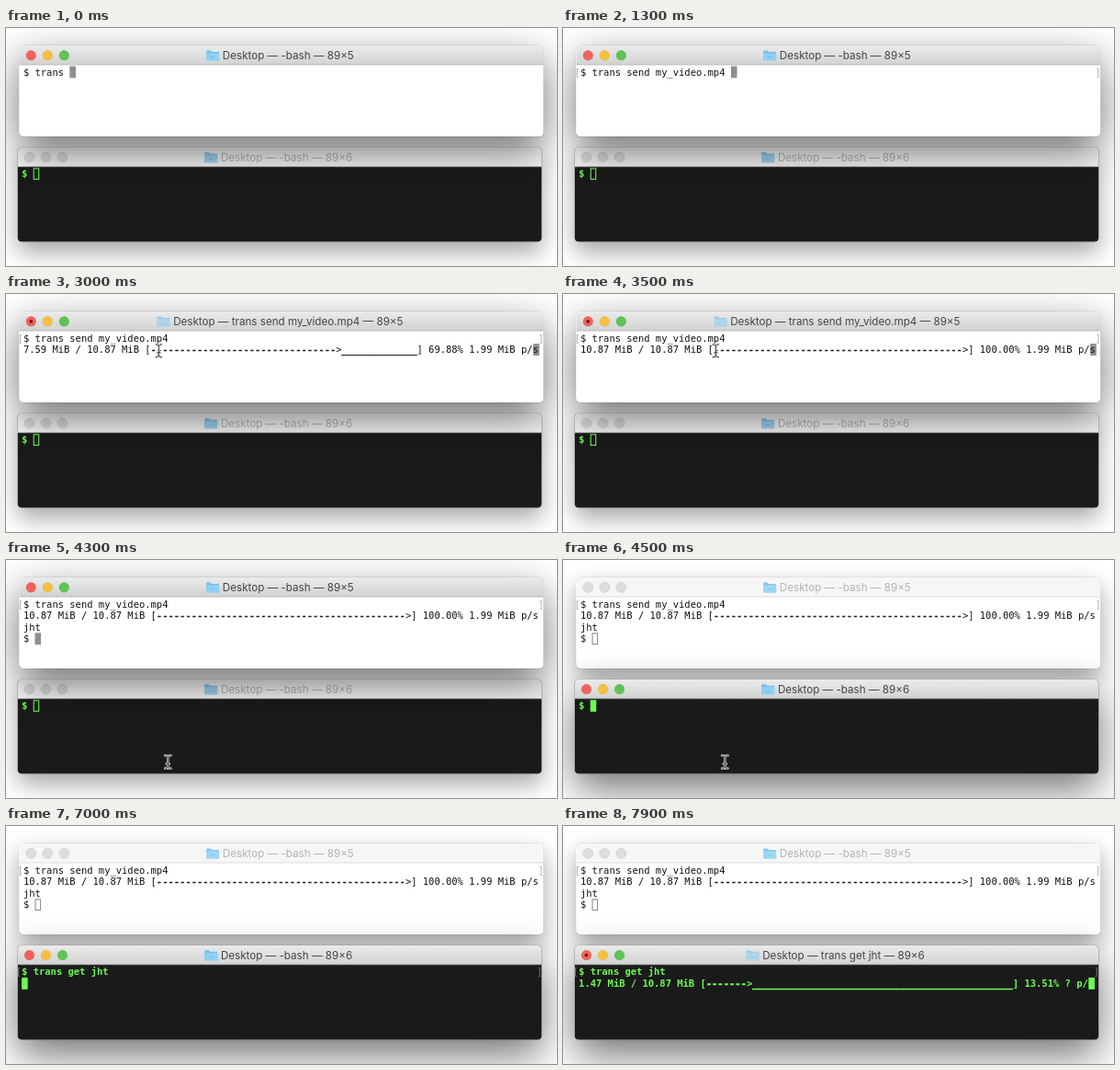
These frames come from a looping animation (600 by 259 pixels, 8000 ms). An HTML page:

```html
<!DOCTYPE html>
<html lang="en">
<head>
<meta charset="utf-8">
<title>Two terminals</title>
<style>
html, body { margin: 0; width: 100%; height: 100%; overflow: hidden; background: #fff; }
#stage { position: relative; width: 600px; height: 259px; overflow: hidden; background: #fff; }
.win {
  position: absolute; left: 0; top: 0; width: 570.6px; border-radius: 5px; z-index: 1;
  box-shadow: 0 0 0 .5px rgba(0,0,0,.12), 0 11px 26px rgba(0,0,0,.36);
}
.win.active {
  z-index: 2;
  box-shadow: 0 0 0 .5px rgba(0,0,0,.14), 0 16px 44px rgba(0,0,0,.56);
}
.win svg { display: block; width: 100%; height: 100%; border-radius: 5px; }
.light { --ink: #111; --paper: #fff; --cursor: #8f8f8f; --mark: #aaa; }
.dark { --ink: #6dfb55; --paper: #1a1a1a; --cursor: #6dfb55; --mark: #777; font-weight: bold; }
.paper { fill: var(--paper); }
.bar { fill: #f6f6f6; }
.active .bar { fill: url(#chrome); }
.rule { fill: #d4d4d4; }
.active .rule { fill: #b2b2b2; }
.light-btn { fill: #dddddd; stroke: #cbcbcb; stroke-width: .6; }
.active .light-btn { fill: var(--c); stroke: rgba(0,0,0,.08); }
.title { font: 11.63px Inter, sans-serif; fill: #b4b4b4; text-anchor: middle; }
.active .title { fill: #444; }
.row { font-family: "DejaVu Sans Mono", monospace; font-size: 10.48px; fill: var(--ink); white-space: pre; }
.run { stroke: var(--ink); stroke-width: .5; }
.mark { fill: var(--mark); font-weight: normal; }
.cursor { fill: none; stroke: var(--cursor); stroke-width: 1.1; }
.active .cursor { fill: var(--cursor); }
#mouse { position: absolute; left: 0; top: 0; z-index: 3; }
</style>
</head>
<body>
<div id="stage">
  <svg id="mouse" width="600" height="259">
    <defs>
      <linearGradient id="chrome" x2="0" y2="1">
        <stop stop-color="#ebebeb"/><stop offset="1" stop-color="#d2d2d2"/>
      </linearGradient>
      <path id="beamPath" d="M-3.2-7Q0-7 0-5Q0-7 3.2-7M0-5V5M-3.2 7Q0 7 0 5Q0 7 3.2 7M-1.6 2H1.6"/>
    </defs>
    <g id="beam" fill="none" stroke-linecap="round">
      <use href="#beamPath" stroke="#e4e4e4" stroke-width="2.4"/>
      <use href="#beamPath" stroke="#2a2a2a" stroke-width=".9"/>
    </g>
  </svg>
</div>
<script>
const LOOP = 8000, COLS = 89, CW = 6.31, LH = 12.6, X0 = 4.6, Y0 = 22.6, TOTAL = 10.866;
const MID = 293;
const stage = document.getElementById('stage');
const beam = document.getElementById('beam');

function add(parent, tag, attrs) {
  const el = document.createElementNS('http://www.w3.org/2000/svg', tag);
  for (const k in attrs) el.setAttribute(k, attrs[k]);
  parent.appendChild(el);
  return el;
}

// Long runs of dashes and underscores get a heavier stroke.
function setRow(el, text) {
  if (el.textContent !== text)
    el.innerHTML = text.replace(/-{2,}|_{2,}/g, '<tspan class="run">$&</tspan>');
}

function makeWindow(theme, left, top, height) {
  const box = document.createElement('div');
  box.style.cssText = `transform:translate(${left}px,${top}px);height:${height}px`;
  stage.appendChild(box);
  const svg = add(box, 'svg', {});
  add(svg, 'rect', { class: 'paper', width: 571, height });
  add(svg, 'rect', { class: 'bar', width: 571, height: 21 });
  add(svg, 'rect', { class: 'rule', y: 20.6, width: 571, height: .8 });
  ['#f0635a', '#f7bf42', '#5fc454'].forEach((c, i) =>
    add(svg, 'circle', { class: 'light-btn', cx: 13 + 18 * i, cy: 10.8, r: 5.5, style: `--c:${c}` }));
  const dot = add(svg, 'circle', { cx: 13, cy: 10.8, r: 1.9, fill: '#7a1410' });
  const folder = add(svg, 'g', {});
  add(folder, 'path', { d: 'M0 1.5Q0 .5 1 .5H4.6L6 2H13Q14 2 14 3V11H0Z', fill: '#72bfea' });
  add(folder, 'rect', { y: 3.4, width: 14, height: 8.4, rx: .8, fill: '#8fd0f4' });
  add(folder, 'path', { d: 'M4.5 7.8H9.5', stroke: '#72b8e0', 'stroke-width': .9 });
  const title = add(svg, 'text', { class: 'title', x: MID, y: 15.1 });
  const cursor = add(svg, 'rect', { class: 'cursor', width: 5.5, height: 11.7 });
  const text = (col, row, cls = 'row') =>
    add(svg, 'text', { class: cls, x: X0 + col * CW, y: Y0 + 10 + row * LH });
  const rows = [0, 1, 2, 3].map(r => text(0, r));
  const marks = [text(-1, 0, 'row mark'), text(COLS - .15, 0, 'row mark')];
  marks[0].textContent = '[';
  marks[1].textContent = ']';

  return s => {
    box.className = `win ${theme}${s.active ? ' active' : ''}`;
    if (title.textContent !== s.title) title.textContent = s.title;
    const x = MID - title.getComputedTextLength() / 2 - 17.7;
    folder.setAttribute('transform', `translate(${x} 4.9)`);
    folder.setAttribute('opacity', s.busy ? .6 : s.active ? 1 : .85);
    dot.style.display = s.dirty ? '' : 'none';
    rows.forEach((el, i) => setRow(el, s.rows[i] || ''));
    marks.forEach(el => el.style.display = s.entered ? '' : 'none');
    const last = s.rows.length - 1;
    const col = Math.min(s.rows[last].length, COLS - 1);
    cursor.setAttribute('x', X0 + col * CW + .5);
    cursor.setAttribute('y', Y0 + last * LH + .5);
  };
}

const drawTop = makeWindow('light', 14.3, 19, 99);
const drawBottom = makeWindow('dark', 12.5, 129.8, 103);

const typed = (text, times, t) => text.slice(0, times.filter(k => k <= t).length);

function progress(p, rate) {
  const head = `${(p * TOTAL).toFixed(2)} MiB / ${TOTAL.toFixed(2)} MiB [`;
  const tail = `] ${(p * 100).toFixed(2)}% ${rate} p/s`;
  const room = COLS - head.length - tail.length;
  const done = Math.min(Math.floor(p * room), room - 1);
  return head + '-'.repeat(done) + '>' + '_'.repeat(room - done - 1) + tail;
}

const sendKeys = [100, 200, 300, 400, 500, 600, 800];
const getKeys = [4700, 4900, 5100, 5200, 5400, 5500, 5700, 5800, 5900, 6100, 6300, 6500, 6700];

function topState(t) {
  const rows = ['$ trans ' + (t < 1000 ? typed('send my', sendKeys, t) : 'send my_video.mp4 ')];
  if (t >= 1400) rows.push('');
  if (t >= 2100) rows[1] = progress(Math.min(1, (t - 2000) / 1000 * .6988), t < 2300 ? '?' : '1.99 MiB');
  if (t >= 3700) rows.push('jht', '$ ');
  const busy = t >= 1500 && t < 3700;
  return {
    rows, busy, active: t < 4400, entered: t >= 1300, dirty: busy && t >= 2100,
    title: `Desktop — ${busy ? 'trans send my_video.mp4' : '-bash'} — 89×5`
  };
}

function bottomState(t) {
  const rows = ['$ ' + typed('trans get jht', getKeys, t)];
  if (t >= 6900) rows.push('');
  if (t >= 7400) rows[1] = progress((t - 7300) / 600 * .1351, '?');
  const busy = t >= 7200;
  return {
    rows, busy, active: t >= 4400, entered: t >= 6900, dirty: t >= 7800,
    title: `Desktop — ${busy ? 'trans get jht' : '-bash'} — 89×6`
  };
}

function drawMouse(t) {
  const k = Math.max(0, Math.min(1, (t - 3800) / 400));
  const e = k * k * (3 - 2 * k);
  beam.style.display = t >= 2700 && t < 4700 ? '' : 'none';
  beam.setAttribute('transform', `translate(${166.3 + 10 * e} ${61.8 + 158 * e})`);
}

const start = performance.now();
function frame() {
  const now = Math.max(0, performance.now() - start) % LOOP;
  const t = Math.floor(now / 100) * 100;
  drawTop(topState(t));
  drawBottom(bottomState(t));
  drawMouse(t);
  requestAnimationFrame(frame);
}
frame();
</script>
</body>
</html>
```
